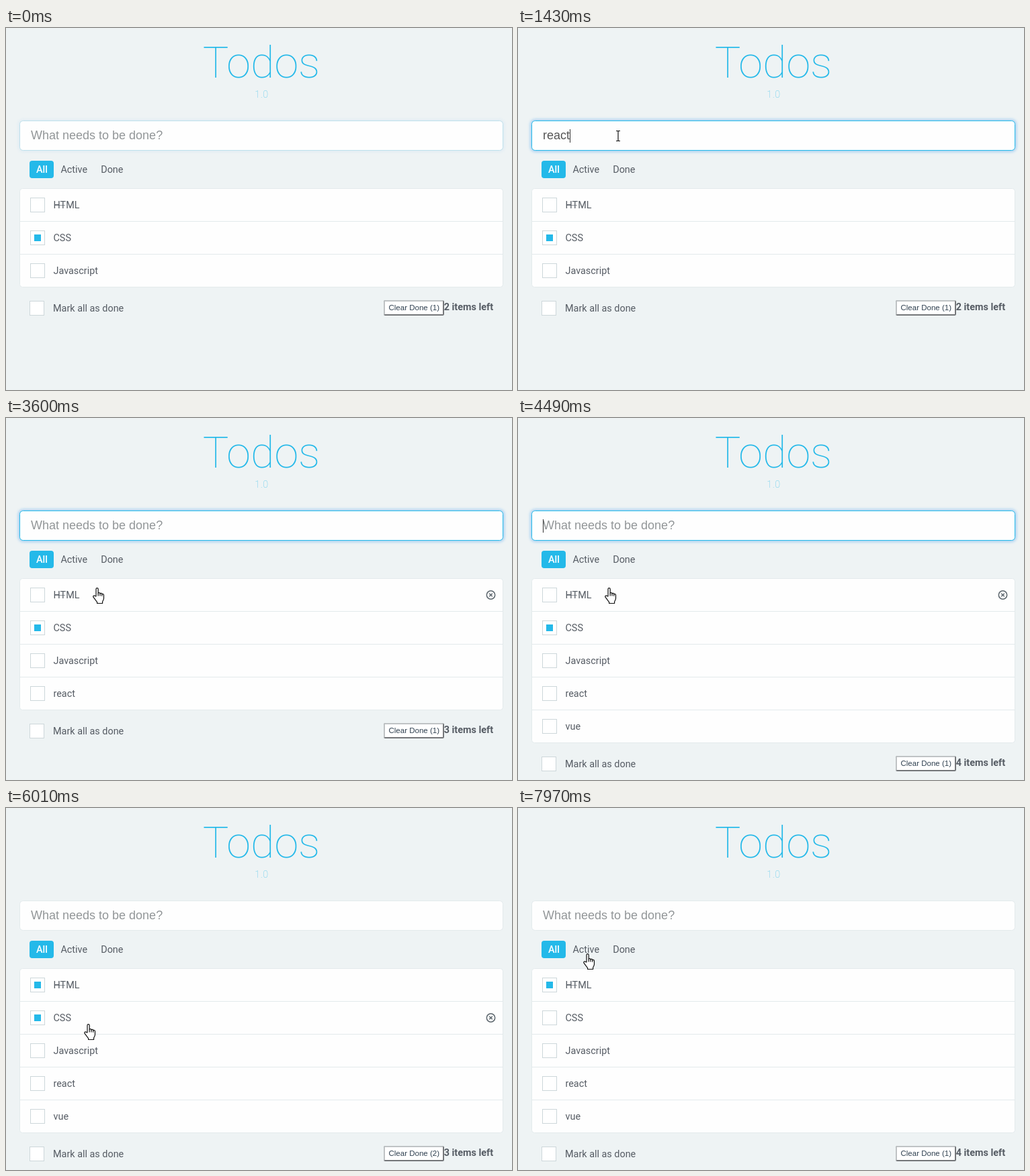
An HTML page for the animation above (7.99 s loop, 753 by 540 pixels).

```html
<!DOCTYPE html>
<html lang="en">
<head>
<meta charset="utf-8">
<title>Todos</title>
<style>
  html, body { margin: 0; width: 100%; height: 100%; overflow: hidden; background: #eef3f4; }
  svg { display: block; width: 753px; height: 540px; }
  text { font: 14.4px Roboto, sans-serif; fill: #565c64; white-space: pre; }
  .title { font-size: 64.8px; font-weight: 100; fill: #24b9e9; text-anchor: middle; }
  .version { font-weight: 100; fill: #24b9e9; text-anchor: middle; letter-spacing: .5px; opacity: .8; }
  .entry { font: 18px "Liberation Sans", Arial, sans-serif; }
  .button { font: 11.52px "Liberation Sans", Arial, sans-serif; fill: #2f4050; }
  .left { font-weight: 700; text-anchor: end; }
  .card { fill: #fefefe; stroke: #e3eaec; }
  .box { fill: #fff; stroke: #cdd7da; }
  .accent { fill: #24b9e9; }
  .glow { fill: none; stroke: #5aa9ee; stroke-width: 4; filter: blur(2px); }
  .icon { fill: none; stroke: #5c666d; stroke-width: 1.5; }
  .cursor path { stroke-linejoin: round; }
</style>
</head>
<body>
<svg id="stage" viewBox="0 0 753 540">
  <text class="title" x="380" y="74">Todos</text>
  <text class="version" x="380.5" y="104">1.0</text>

  <rect id="glow" class="glow" x="20.5" y="138.5" width="719" height="44" rx="5"/>
  <rect id="field" class="card" x="20.5" y="138.5" width="719" height="44" rx="5"/>
  <text id="entry" class="entry" x="37" y="166"></text>
  <rect id="caret" y="151" width="1" height="20" fill="#333"/>

  <rect class="accent" x="35" y="198" width="36" height="26" rx="4"/>
  <text x="45" y="216" style="fill:#fff;font-weight:500">All</text>
  <text x="81.4" y="216">Active</text>
  <text x="141.2" y="216">Done</text>

  <rect id="list" class="card" x="20.5" y="239.5" width="719" rx="4"/>
  <g id="rows"></g>

  <g id="footer">
    <rect class="box" x="35.5" y="407.5" width="21" height="21"/>
    <text x="70" y="423">Mark all as done</text>
    <rect x="562" y="406" width="90" height="23" rx="2.5" fill="#747679"/>
    <path d="M562 428V408.500Q562 406 564.500 406H651L650 408H564V427Z" fill="#bfc3c5"/>
    <rect x="564" y="408" width="86" height="19" fill="#fff"/>
    <text id="clear" class="button" x="569.500" y="421"></text>
    <text id="left" class="left" x="725" y="421"></text>
  </g>

  <circle id="ring" r="12" fill="#fff200" fill-opacity=".55"/>
  <g id="cursor" class="cursor">
    <g id="beam">
      <path d="M-3-7.500h2.200L0-7 .8-7.500H3M0-7V7M-3 7.500h2.200L0 7 .8 7.500H3" fill="none" stroke="#fff" stroke-width="2.600"/>
      <path d="M-3-7.500h2.200L0-7 .8-7.500H3M0-7V7M-3 7.500h2.200L0 7 .8 7.500H3" fill="none" stroke="#111" stroke-width="1.200"/>
    </g>
    <path id="arrow" d="M0 0V16L3.700 12.400 6 18 8.600 17 6.200 11.600H11Z" fill="#fff" stroke="#111"/>
    <g id="hand" transform="translate(-6 -1)" fill="#fff" stroke="#111" stroke-width="1.200">
      <path d="M5 13V2.200C5 .2 8.200 .2 8.200 2.200V8.300C8.600 7 11 7.400 11 9C11.600 7.800 13.800 8.200 13.800 9.900C14.400 9 16.500 9.400 16.500 11.200V16C16.500 18.600 15 19.500 14.600 21V23.500H6.600V21.600C5 19.500 2.600 16.500 1 14.200C.1 12.600 2 11.200 3.300 12.400Z"/>
      <path d="M8.200 8.300V12.500M11 9V12.600M13.800 9.900V12.800" fill="none"/>
    </g>
  </g>
</svg>
<script>
const LOOP = 7990, TOP = 239, ROW = 49;
const $ = id => document.getElementById(id);

// Pointer hot spot: time, x, y
const path = [
  [30, 555, 488], [770, 145, 161], [820, 145, 161], [900, 149, 161],
  [2530, 149, 161], [2940, 135, 254], [5430, 135, 254], [5520, 134, 257],
  [5700, 134, 257], [6190, 117, 351], [6800, 117, 351], [7010, 117, 350],
  [7200, 115, 310], [7400, 115, 309], [7600, 112, 261], [7970, 103, 218]
];
const clicks = [[825, 920], [5430, 5570], [6260, 6400], [6810, 6900], [7260, 7370]];

const typed = [
  [0, ""], [1000, "r"], [1100, "re"], [1210, "rea"], [1320, "reac"], [1430, "react"],
  [1780, ""], [3760, "b"], [3980, ""], [4080, "v"], [4180, "vu"], [4270, "vue"], [4490, ""]
];
const carets = [
  [0, 0], [840, 1], [1780, 0], [1890, 1], [2230, 0], [2570, 1], [2920, 0],
  [3280, 1], [3600, 0], [3760, 1], [4810, 0], [5160, 1], [5430, 0]
];
const counts = [[0, 3], [1780, 4], [4490, 5]];

const items = [
  { name: "HTML", done: [[0, 0], [5570, 1]] },
  { name: "CSS", done: [[0, 1], [7370, 0]] },
  { name: "Javascript", done: [[0, 0], [6400, 1], [6900, 0]] },
  { name: "react", done: [[0, 0]] },
  { name: "vue", done: [[0, 0]] }
];

$("rows").innerHTML = items.map(({ name }, i) => `
  <g transform="translate(0 ${TOP + i * ROW})">
    ${i ? '<path d="M21 .5H739" stroke="#e3eaec"/>' : ""}
    <rect class="box" x="36.5" y="14.5" width="21" height="21"/>
    <rect class="accent mark" x="42" y="20" width="10" height="10"/>
    <text x="70.500" y="30">${name}</text>
    ${i ? "" : '<path d="M72 25.500H88" stroke="#565c64" stroke-opacity=".6"/>'}
    <g class="icon" transform="translate(721.5 25)">
      <circle r="6.200"/><path d="M-2.300-2.300 2.300 2.300M2.300-2.300-2.300 2.300"/>
    </g>
  </g>`).join("");

const rows = [...$("rows").children].map(el => ({
  el, mark: el.querySelector(".mark"), icon: el.querySelector(".icon")
}));

const show = (el, on) => { el.style.display = on ? "" : "none"; };
const at = (steps, t) => steps.reduce((v, s) => s[0] <= t ? s[1] : v, steps[0][1]);
const ramp = (t, a, b) => Math.min(1, Math.max(0, (t - a) / (b - a)));
const smooth = p => p * p * (3 - 2 * p);
const mix = (a, b, p) => a.map((v, i) => Math.round(v + (b[i] - v) * p));

function pointer(t) {
  let i = 0;
  while (i < path.length - 2 && path[i + 1][0] <= t) i++;
  const [ta, xa, ya] = path[i], [tb, xb, yb] = path[i + 1];
  const p = smooth(ramp(t, ta, tb));
  return [xa + (xb - xa) * p, ya + (yb - ya) * p];
}

function focusLevel(t) {
  if (t < 820) return .2 * (1 - ramp(t, 0, 100));
  return smooth(ramp(t, 840, 1100)) * (1 - smooth(ramp(t, 5450, 5760)));
}

function drawField(t) {
  const focus = focusLevel(t), text = at(typed, t);
  $("glow").style.opacity = focus * .6;
  $("field").style.stroke = `rgb(${mix([227, 234, 236], [36, 185, 233], focus)})`;
  const entry = $("entry");
  entry.textContent = text || "What needs to be done?";
  entry.style.fill = text ? "#555" : "#929698";
  $("caret").setAttribute("x", Math.round(37 + (text ? entry.getComputedTextLength() : 0)));
  show($("caret"), at(carets, t));
}

function drawList(t, x, y) {
  const count = at(counts, t);
  const hover = x > 20 && x < 740 && t >= 30 ? Math.floor((y - TOP) / ROW) : -1;
  let done = 0;
  $("list").setAttribute("height", count * ROW);
  rows.forEach((row, i) => {
    const checked = at(items[i].done, t);
    done += checked;
    show(row.el, i < count);
    show(row.mark, checked);
    show(row.icon, i === hover);
  });
  $("footer").setAttribute("transform", `translate(0 ${(count - 3) * ROW})`);
  $("clear").textContent = `Clear Done (${done})`;
  $("left").textContent = `${count - done} items left`;
  return hover >= 0 && hover < count;
}

function drawPointer(t, x, y, onRow) {
  const onField = y > 138 && y < 183;
  const onTab = y > 198 && y < 224 && x > 35 && x < 185;
  const onHand = onRow || onTab;
  const place = `translate(${Math.round(x)} ${Math.round(y)})`;
  $("cursor").setAttribute("transform", place);
  $("ring").setAttribute("transform", place);
  show($("cursor"), t >= 30);
  show($("beam"), onField);
  show($("hand"), onHand);
  show($("arrow"), !onField && !onHand);
  show($("ring"), clicks.some(([a, b]) => t >= a && t < b));
}

function render(t) {
  const [x, y] = pointer(t);
  drawField(t);
  drawPointer(t, x, y, drawList(t, x, y));
}

const start = performance.now();
function tick() {
  render((performance.now() - start) % LOOP);
  requestAnimationFrame(tick);
}
tick();
</script>
</body>
</html>
```
